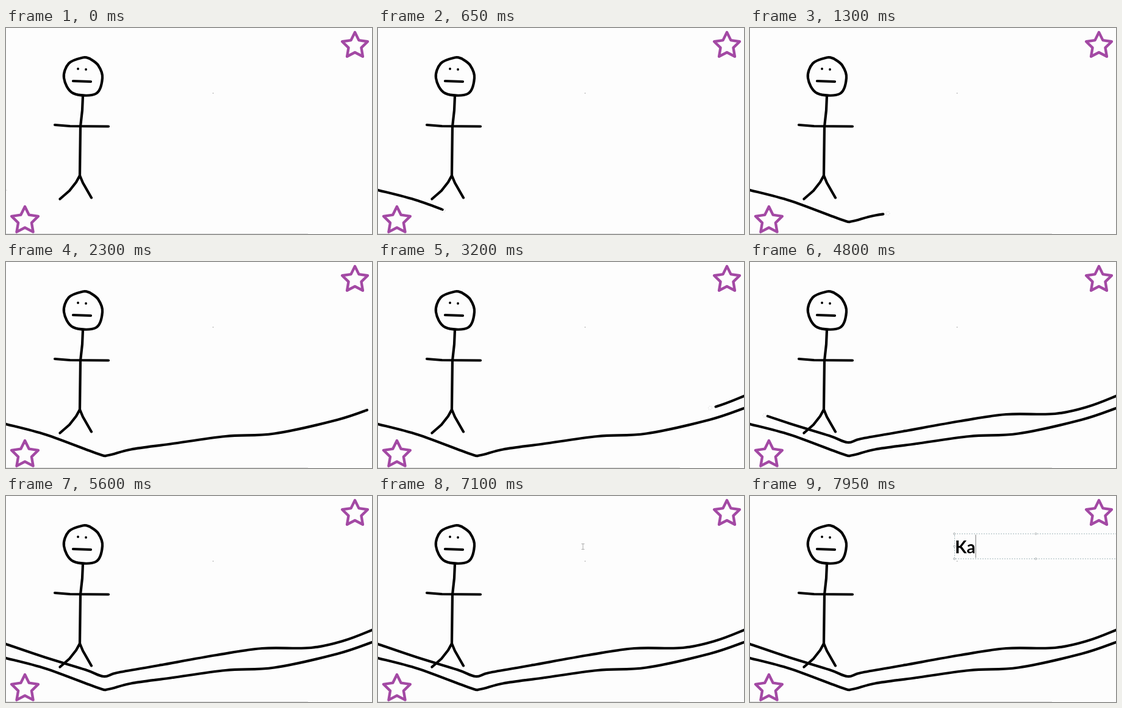
An HTML page for the animation above (8000 ms loop, 600 by 338 pixels).

```html
<!DOCTYPE html>
<html lang="en">
<head>
<meta charset="utf-8">
<title>Stick figure sketch</title>
<style>
html, body { margin: 0; width: 100%; height: 100%; overflow: hidden; background: #fdfdfd; }
svg { display: block; width: 600px; height: 338px; }
.ink, .star { fill: none; stroke: #000; stroke-width: 4.2; stroke-linecap: round; stroke-linejoin: round; }
.star { stroke: #a349a4; stroke-width: 4.4; }
.word { font: 700 28px Lato, Carlito, sans-serif; }
.frame { fill: none; stroke: #9fb4b8; stroke-dasharray: 2 2; }
.handle { fill: #fff; stroke: #a0a8aa; stroke-width: .9; }
</style>
</head>
<body>
<svg viewBox="0 0 600 338">
  <path d="M0 337.5H495" stroke="#dedede"/>
  <circle cx="339.5" cy="107" r=".7" fill="#888"/>
  <path id="star1" class="star"/>
  <path id="star2" class="star"/>
  <g class="ink">
    <path id="head"/>
    <path d="M118 67h.1M131 68h.1" stroke-width="3.8"/>
    <path d="M110 87 139 88"/>
    <path d="M126 112 125 135 122 162 121 242"/>
    <path d="M80 159 105 161 168 161.5"/>
    <path d="M88.500 280.500 104 267 115 253 121 242 126 254 140 278.500"/>
  </g>
  <path id="lower" class="ink"/>
  <path id="upper" class="ink"/>
  <g id="box">
    <path class="frame" d="M601 62H335.500V103H601"/>
    <g id="handles"></g>
    <text id="word" class="word" x="336" y="93.500"></text>
    <path id="caret" d="M0 63.500V101.500" stroke="#777"/>
  </g>
  <circle id="brush" r="3" fill="none" stroke="#bbb" stroke-width=".8" stroke-dasharray="1 2"/>
  <path id="beam" d="M-2.500 -4.500H2.500M0 -4.500V4.500M-2.500 4.500H2.500" fill="none" stroke="#999" stroke-width=".8"/>
</svg>
<script>
const LOOP = 8000, STEP = 50, SPAN = 600;
const $ = id => document.getElementById(id);
const show = (el, on) => { el.style.visibility = on ? "visible" : "hidden"; };
const place = (el, x, y) => el.setAttribute("transform", `translate(${x} ${y})`);

// Smooth curve through a few points.
function curve(id, pts) {
  const at = i => pts[Math.max(0, Math.min(pts.length - 1, i))];
  let d = `M${pts[0]}`;
  for (let i = 1; i < pts.length; i++) {
    const [a, b, c, e] = [at(i - 2), at(i - 1), at(i), at(i + 1)];
    const c1 = b.map((v, n) => v + (c[n] - a[n]) / 6);
    const c2 = c.map((v, n) => v - (e[n] - b[n]) / 6);
    d += `C${c1} ${c2} ${c}`;
  }
  $(id).setAttribute("d", d);
  return $(id);
}

function star(id, cx, cy, r) {
  const pts = Array.from({ length: 10 }, (_, i) => {
    const a = i * Math.PI / 5, q = i % 2 ? r / 2 : r;
    return [cx + q * Math.sin(a), cy - q * Math.cos(a)];
  });
  $(id).setAttribute("d", `M${pts.join("L")}Z`);
}

// Linear interpolation over [time, value] pairs.
function track(keys, t) {
  const i = keys.findIndex(k => k[0] > t);
  if (i < 0) return keys[keys.length - 1][1];
  if (i === 0) return keys[0][1];
  const [t0, a] = keys[i - 1], [t1, b] = keys[i];
  return a + (b - a) * (t - t0) / (t1 - t0);
}
const ramp = (t, t0, t1, a, b) => track([[t0, a], [t1, b]], t);

star("star1", 572, 29, 22);
star("star2", 31, 316, 23);
curve("head", [[137,50],[126,48.5],[103,58],[95,82],[110,107],[147,108],[158,82],[151,61],[137,50]]);

// Ink is measured in units of 1/600 of the stroke.
const strokes = [
  { el: curve("lower", [[0,266],[66,283.5],[150,314.5],[168,317],[205,307.5],[270,298.5],
      [360,286],[440,281.5],[543,259],[600,240]]),
    ink: [[100,0],[950,166],[1100,167],[1300,222],[1900,505],[2300,591.5],[2400,600]] },
  { el: curve("upper", [[600,220],[555,237],[500,249],[420,250],[345,261],[250,278],
      [182,290],[160,296],[130,285],[65,265],[0,243]]),
    ink: [[2700,0],[3100,12],[3850,283],[4750,563],[5000,600]] }
];
for (const { el } of strokes) el.setAttribute("pathLength", SPAN);

$("handles").innerHTML = [335, 468.5].flatMap(x => [62, 103].map(y => [x, y])).concat([[335, 82.5]])
  .map(([x, y]) => `<circle class="handle" cx="${x}" cy="${y}" r="1.5"/>`).join("");

function draw(t) {
  for (const { el, ink } of strokes) {
    const n = track(ink, t);
    el.style.strokeDasharray = `${n} 2000`;
    show(el, n > 0);
  }

  // The brush runs slightly ahead of its ink, then leaves at the top right.
  const { el, ink } = strokes[t < 2600 ? 0 : 1];
  const p = el.getPointAtLength(track(ink, t + 20) / SPAN * el.getTotalLength());
  place($("brush"), ramp(t, 5150, 5600, p.x - 2, 600), ramp(t, 5150, 5600, p.y, -4));
  show($("brush"), t < 5600);

  place($("beam"), track([[6450, 46], [7100, 336], [7300, 320], [7450, 323]], t),
    track([[6450, -6], [7100, 83], [7300, 102]], t));
  show($("beam"), t >= 6500 && t < 7800);

  const typed = t < 7800 ? 0 : t < 7900 ? 1 : 2;
  const open = t >= 7150;
  show($("box"), open);
  show($("caret"), open && (t < 7650 || typed));
  $("word").textContent = "Ka".slice(0, typed);
  place($("caret"), 336 + typed * 17, 0);
}

const start = performance.now();
function tick() {
  const t = (performance.now() - start) % LOOP;
  draw(Math.floor(t / STEP) * STEP);
  requestAnimationFrame(tick);
}
draw(0);
requestAnimationFrame(tick);
</script>
</body>
</html>
```
